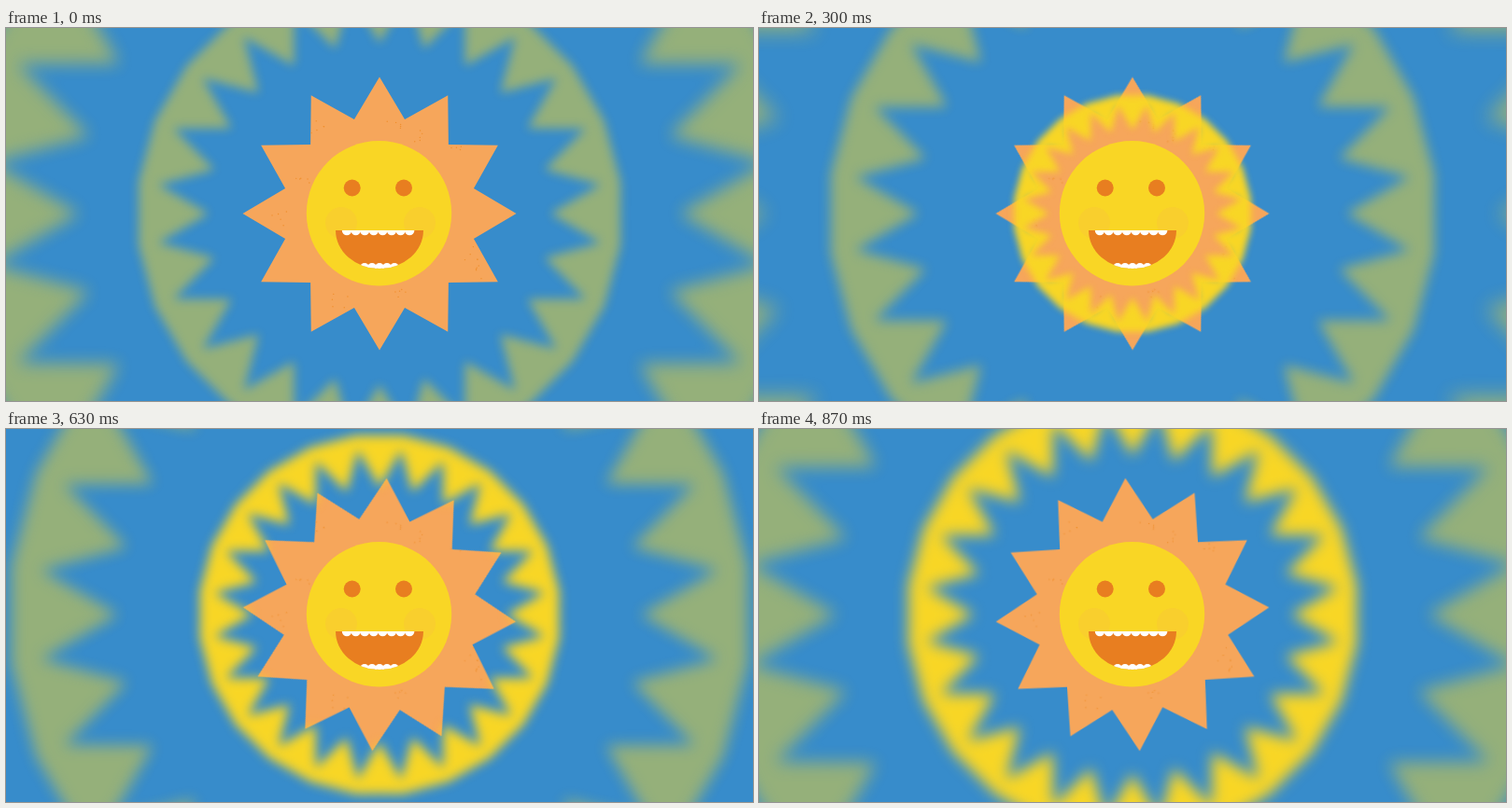
Write an HTML page that moves like this. It is 800 by 400 pixels and loops after 0.9 s.

```html
<!DOCTYPE html>
<html lang="en">
<head>
<meta charset="utf-8">
<title>Smiling sun</title>
<style>
  html, body { margin: 0; width: 100%; height: 100%; overflow: hidden; background: #378ccb; }
  svg { display: block; width: 800px; height: 400px; }
  .spin, .unspin, .wave { animation: 900ms steps(30, end) infinite; }
  .spin { animation-name: spin; }
  .unspin { animation-name: unspin; }
  .near { animation-name: near; }
  .mid { animation-name: mid; }
  .far { animation-name: far; }
  .pale { opacity: .49; }
  @keyframes spin { from { transform: rotate(0deg); } to { transform: rotate(90deg); } }
  @keyframes unspin { from { transform: rotate(0deg); } to { transform: rotate(-90deg); } }
  @keyframes near { from { transform: scale(.67); } to { transform: scale(2.46); } }
  @keyframes mid { from { transform: scale(2.58); } to { transform: scale(4.53); } }
  @keyframes far { from { transform: scale(4.53); } to { transform: scale(7.5); } }
</style>
</head>
<body>
<svg viewBox="0 0 800 400">
  <defs>
    <path id="ring" fill="#f8d625" fill-rule="evenodd"/>
    <filter id="soft" x="-20%" y="-20%" width="140%" height="140%" color-interpolation-filters="sRGB">
      <feGaussianBlur stdDeviation="2"/>
    </filter>
    <filter id="softer" x="-20%" y="-20%" width="140%" height="140%" color-interpolation-filters="sRGB">
      <feGaussianBlur stdDeviation="3"/>
    </filter>
    <clipPath id="rayClip"><path id="rayShape"/></clipPath>
    <clipPath id="mouthClip"><path d="M353 217H447A47 41 0 0 1 353 217Z"/></clipPath>
  </defs>

  <rect width="800" height="400" fill="#378ccb"/>

  <g transform="translate(400 199)">
    <g class="pale"><g class="wave far"><use href="#ring" filter="url(#soft)"/></g></g>
    <g class="pale"><g class="wave mid"><use href="#ring" filter="url(#soft)"/></g></g>
    <g class="spin">
      <path id="rays" fill="#f6a65b"/>
      <g clip-path="url(#rayClip)"><g id="specks" class="unspin" fill="#ef8f2e"></g></g>
    </g>
    <g class="wave near"><use href="#ring" filter="url(#softer)"/></g>
  </g>

  <circle cx="399.5" cy="198.7" r="77.7" fill="#f9d625"/>
  <g fill="#f9cf2d">
    <circle cx="359" cy="209" r="17"/>
    <circle cx="443" cy="209" r="17"/>
  </g>
  <g fill="#e87e20">
    <circle cx="370.7" cy="171.5" r="9"/>
    <circle cx="426" cy="171.5" r="9"/>
  </g>
  <g clip-path="url(#mouthClip)">
    <rect x="350" y="215" width="100" height="45" fill="#e87e20"/>
    <g id="teeth" fill="#fff"></g>
  </g>
</svg>
<script>
  const $ = id => document.getElementById(id);

  // Closed outline whose radius alternates between outer and inner
  const star = (n, outer, inner) => {
    let d = '';
    for (let i = 0; i < 2 * n; i++) {
      const a = Math.PI * i / n, r = i % 2 ? inner : outer;
      d += (i ? 'L' : 'M') + (r * Math.sin(a)).toFixed(2) + ' ' + (-r * Math.cos(a)).toFixed(2);
    }
    return d + 'Z';
  };

  const dot = (parent, x, y, r) => {
    const c = document.createElementNS('http://www.w3.org/2000/svg', 'circle');
    c.setAttribute('cx', x);
    c.setAttribute('cy', y);
    c.setAttribute('r', r);
    parent.append(c);
  };

  $('ring').setAttribute('d', star(24, 100, 100.9) + star(24, 71, 92.5));
  for (const id of ['rays', 'rayShape']) $(id).setAttribute('d', star(12, 146.5, 104.5));

  const clusters = [[-64, -94], [40, -81], [15, -99], [-83, -34], [-107, 6],
    [106, 62], [80, -71], [20, 86], [-43, 94], [98, 42]];
  let seed = 7;
  const rand = () => (seed = seed * 16807 % 2147483647) / 2147483647;
  for (const [x, y] of clusters)
    for (let i = 0; i < 5; i++)
      dot($('specks'), x + 18 * (rand() - .5), y + 18 * (rand() - .5), .7);

  for (let i = 0; i < 8; i++) dot($('teeth'), 365 + 9.6 * i, 217, 5.2);
  for (let i = 0; i < 5; i++) dot($('teeth'), 384 + 8 * i, 257, 5);
</script>
</body>
</html>
```
